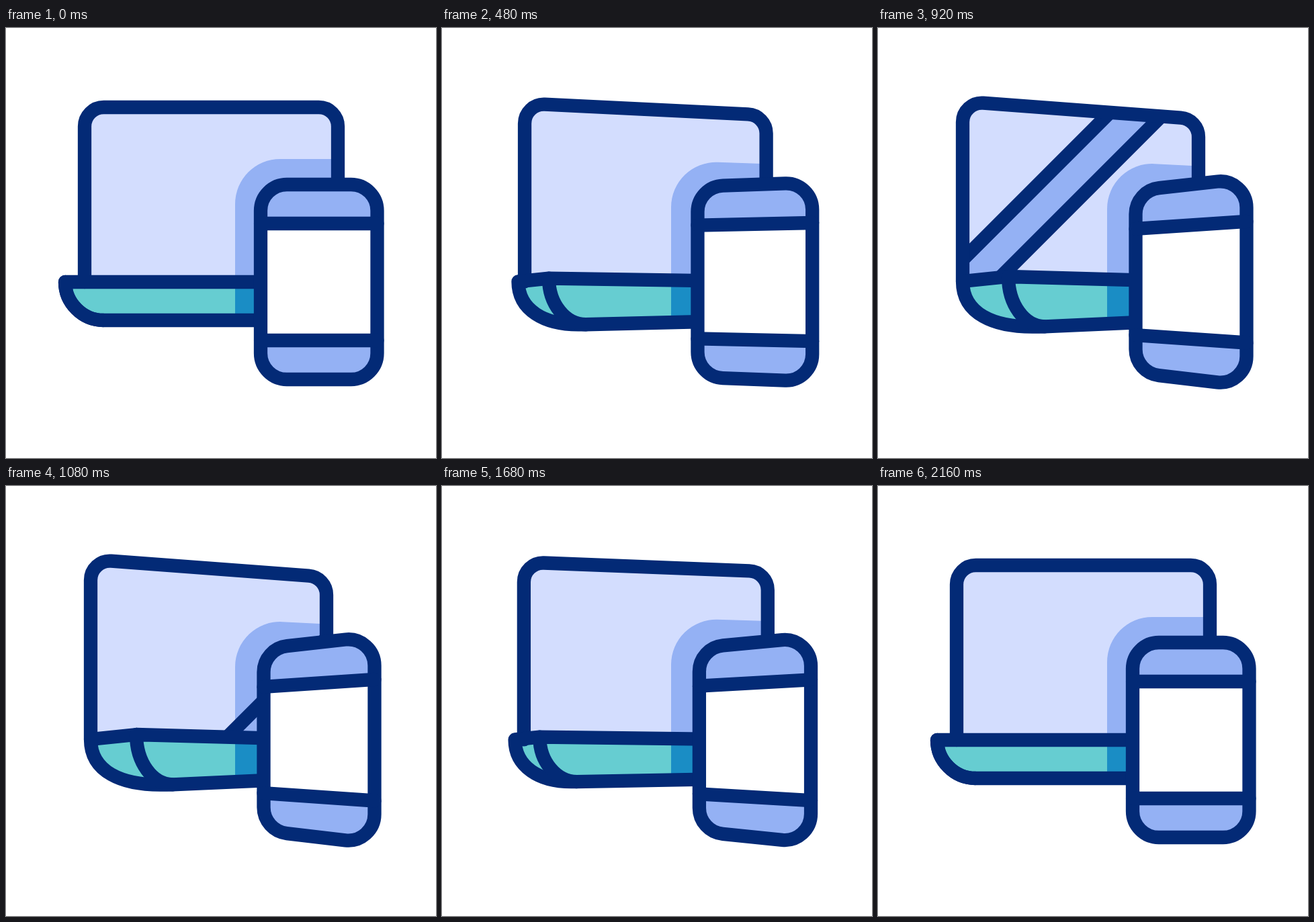
These frames come from a looping animation (640 by 640 pixels, 2.56 s). An HTML page with a canvas:

```html
<!DOCTYPE html>
<html lang="en">
<head>
<meta charset="utf-8">
<title>Laptop and phone</title>
<style>
  html, body { margin: 0; width: 100%; height: 100%; overflow: hidden; background: #fff; }
  canvas { display: block; width: 100vw; height: 100vh; }
</style>
</head>
<body>
<canvas id="stage" width="640" height="640"></canvas>
<script>
const ctx = document.getElementById('stage').getContext('2d');
const LOOP = 2560, STEP = 40;
const NAVY = '#032a76', PALE = '#d3ddfe', MID = '#94b1f4', TEAL = '#66cdd1', BLUE = '#1a8dc5';

const ease = (t, from, to) => {
  const u = Math.min(1, Math.max(0, (t - from) / (to - from)));
  return u * u * (3 - 2 * u);
};

// Point between its flat and its turned position
const mix = (p, x0, y0, x1, y1) => [x0 + (x1 - x0) * p, y0 + (y1 - y0) * p];

function trace(draw) {
  const path = new Path2D();
  draw(path);
  return path;
}

function fill(path, color) {
  ctx.fillStyle = color;
  ctx.fill(path);
}

function stroke(path) {
  ctx.strokeStyle = NAVY;
  ctx.stroke(path);
}

function clipped(path, draw) {
  ctx.save();
  ctx.clip(path);
  draw();
  ctx.restore();
}

function polyline(...points) {
  return trace(c => points.forEach(pt => c.lineTo(...pt)));
}

// Diagonal glare; s is x + y along its trailing edge
function drawGlare(s) {
  const gap = 82;
  const edge = d => [[s + d - 60, 60], [s + d - 520, 520]];
  const [a, b] = edge(0), [c, d] = edge(gap);
  fill(polyline(a, b, d, c), MID);
  stroke(polyline(a, b));
  stroke(polyline(c, d));
}

function drawLaptop(p, t) {
  const at = (...v) => mix(p, ...v);
  const topLeft = at(117, 118, 126, 109.4), topRight = at(494, 118, 477, 135.5);
  const footLeft = at(117, 378, 126, 377), footRight = at(494, 378, 477, 378);
  const side = at(88, 378, 126, 377), corner = at(88, 378, 194, 370);
  const deckEnd = at(390, 378, 390, 375.3), baseEnd = at(390, 435, 390, 438);
  const frontEnd = at(145, 435, 248, 444.3);

  const screen = trace(c => {
    c.moveTo(...footLeft);
    c.arcTo(...topLeft, ...topRight, 28.5);
    c.arcTo(...topRight, ...footRight, 28.5);
    c.lineTo(...footRight);
  });
  fill(screen, PALE);
  clipped(screen, () => {
    fill(trace(c => {
      c.moveTo(341, 400);
      c.arcTo(...at(341, 195, 341, 198.5), ...at(494, 195, 494, 206.5), 67);
      c.lineTo(...at(494, 195, 494, 206.5));
      c.lineTo(494, 400);
    }), MID);
    if (t >= 700 && t <= 1160) drawGlare(703 + (t - 1080) * 1.45);
  });

  const front = trace(c => {
    c.moveTo(...corner);
    c.bezierCurveTo(...at(88, 409, 194, 411), ...at(114, 435, 218, 444.3), ...frontEnd);
    c.lineTo(...baseEnd);
    c.lineTo(...deckEnd);
    c.closePath();
  });
  const flank = trace(c => {
    c.moveTo(...corner);
    c.lineTo(...side);
    c.bezierCurveTo(...at(88, 409, 126, 424), ...at(114, 435, 170, 447), ...at(145, 435, 240, 444.5));
    c.lineTo(...frontEnd);
  });
  fill(flank, TEAL);
  fill(front, TEAL);
  clipped(front, () => {
    ctx.fillStyle = BLUE;
    ctx.fillRect(341, 360, 60, 100);
  });
  stroke(screen);
  stroke(flank);
  stroke(front);
}

function drawPhone(p) {
  const at = (...v) => mix(p, ...v);
  const tl = at(379, 233, 383.5, 242), tr = at(552.5, 233, 548.5, 223.7);
  const bl = at(379, 523, 383.5, 513), br = at(552.5, 523, 548.5, 532.5);
  const upper = [at(379, 291, 383.5, 298.8), at(552.5, 291, 548.5, 287.9)];
  const lower = [at(379, 465, 383.5, 457.2), at(552.5, 465, 548.5, 468.5)];

  const body = trace(c => {
    c.moveTo(tl[0], 378);
    c.arcTo(...tl, ...tr, 39);
    c.arcTo(...tr, ...br, 39);
    c.arcTo(...br, ...bl, 39);
    c.arcTo(...bl, ...tl, 39);
    c.closePath();
  });
  fill(body, MID);
  fill(polyline(...upper, lower[1], lower[0]), '#fff');
  stroke(body);
  stroke(polyline(...upper));
  stroke(polyline(...lower));
}

function render(now) {
  const t = Math.floor((now % LOOP) / STEP) * STEP;
  ctx.fillStyle = '#fff';
  ctx.fillRect(0, 0, 640, 640);
  ctx.lineWidth = 20.3;
  ctx.lineCap = ctx.lineJoin = 'round';
  drawLaptop(ease(t, 160, 680) - ease(t, 1420, 1970), t);
  drawPhone(ease(t, 320, 740) - ease(t, 1582, 2002));
}

const start = performance.now();
function tick() {
  render(performance.now() - start);
  requestAnimationFrame(tick);
}
tick();
</script>
</body>
</html>
```
